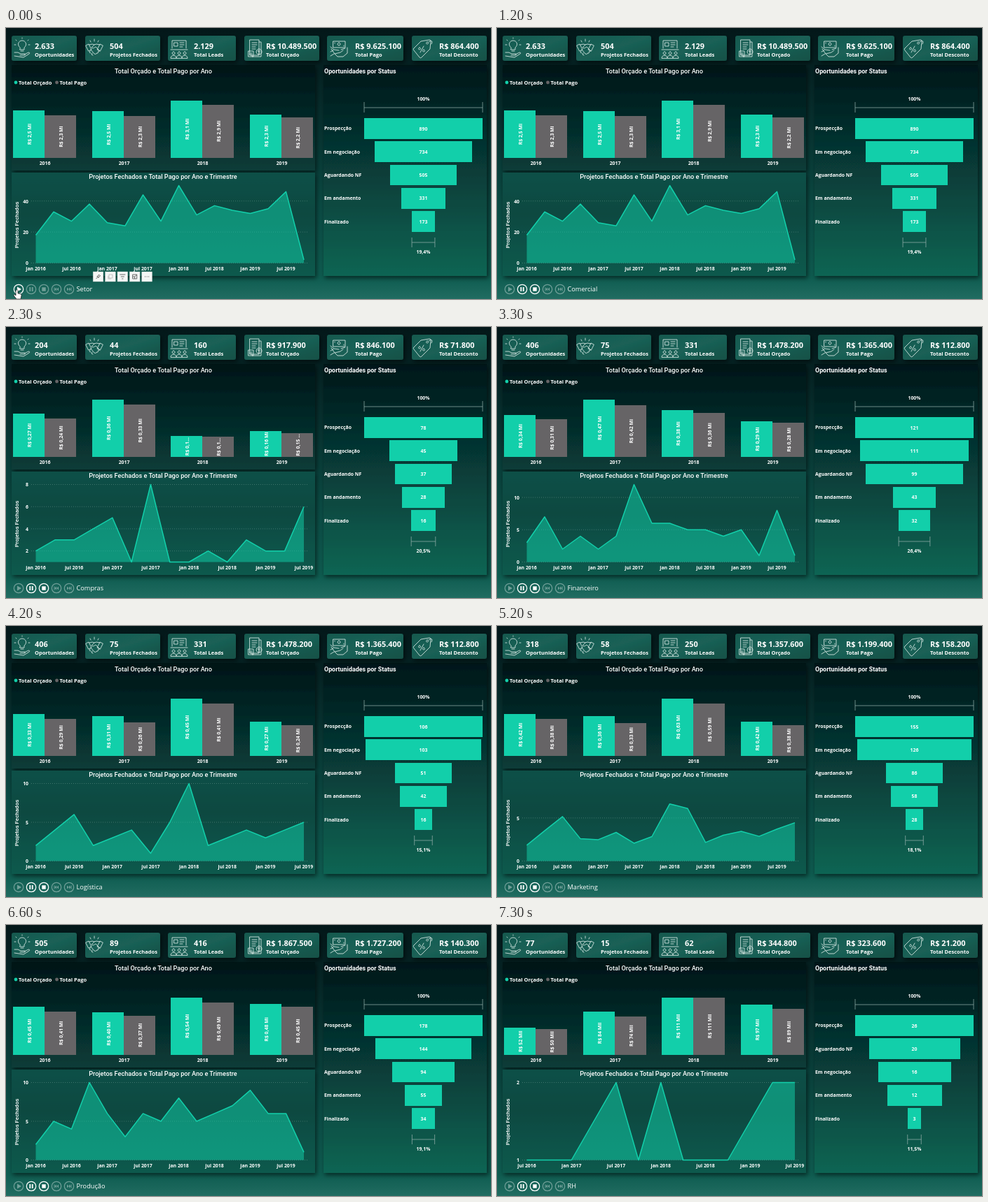
Recreate the animation shown at these times as an HTML page. Size 692 by 388 pixels, loop 8 s.

```html
<!DOCTYPE html>
<html lang="pt-BR">
<head>
<meta charset="utf-8">
<title>Painel de oportunidades</title>
<style>
html, body { margin: 0; width: 100%; height: 100%; overflow: hidden; background: #06292a; }
svg { display: block; width: 692px; height: 388px; }
text { font-family: "Open Sans", "Noto Sans", sans-serif; font-weight: 700; fill: #fff; }
.din { font-family: Roboto, "Liberation Sans", sans-serif; font-weight: 500; }
.kv { font-size: 10.9px; }
.kl { font-size: 7.5px; }
.s { font-size: 6.9px; }
.mid { text-anchor: middle; }
.end { text-anchor: end; }
.crisp { shape-rendering: crispEdges; }
.icon { fill: none; stroke: #e6f3ef; stroke-width: .8; stroke-linecap: round; stroke-linejoin: round; }
</style>
</head>
<body>
<svg id="stage" viewBox="0 0 692 388">
  <defs>
    <linearGradient id="bg" x2="0" y2="1">
      <stop offset="0" stop-color="#031719"/><stop offset=".3" stop-color="#062d2c"/>
      <stop offset=".65" stop-color="#0a4a43"/><stop offset=".92" stop-color="#0e5c50"/>
      <stop offset="1" stop-color="#216c61"/>
    </linearGradient>
    <linearGradient id="top" x2="0" y2="1">
      <stop offset="0" stop-color="#021517"/><stop offset="1" stop-color="#083c38"/>
    </linearGradient>
    <linearGradient id="low" x2="0" y2="1">
      <stop offset="0" stop-color="#0e5047"/><stop offset=".4" stop-color="#0a4941"/>
      <stop offset="1" stop-color="#0b5a4d"/>
    </linearGradient>
    <linearGradient id="side" x2="0" y2="1">
      <stop offset="0" stop-color="#021719"/><stop offset=".5" stop-color="#073c38"/>
      <stop offset="1" stop-color="#0b6553"/>
    </linearGradient>
    <linearGradient id="card" x2="1" y2="1">
      <stop offset="0" stop-color="#17594f"/><stop offset=".5" stop-color="#1a6156"/>
      <stop offset="1" stop-color="#135046"/>
    </linearGradient>
    <filter id="shade" x="-10%" y="-10%" width="125%" height="130%">
      <feDropShadow dx="2" dy="3" stdDeviation="3" flood-color="#000" flood-opacity=".55"/>
    </filter>
  </defs>
  <rect width="692" height="388" fill="url(#bg)"/>
  <g filter="url(#shade)">
    <rect x="8" y="53" width="433" height="151" fill="url(#top)"/>
    <rect x="8" y="207" width="433" height="148" fill="url(#low)"/>
    <rect x="453" y="53" width="233" height="302" fill="url(#side)"/>
  </g>
</svg>
<script>
const TEAL = "#12cfaa", GREY = "#666466";
const LEFT = 42.5, SPAN = 382.5, FLOOR = 336.5, RISE = 111;
const stage = document.getElementById("stage");

function add(tag, attrs = {}, parent = stage) {
  const el = document.createElementNS("http://www.w3.org/2000/svg", tag);
  set(el, attrs);
  parent.append(el);
  return el;
}
function set(el, attrs) {
  for (const k in attrs) el.setAttribute(k, attrs[k]);
}
function write(x, y, str, cls, attrs = {}, parent = stage) {
  const el = add("text", { x, y, class: cls, ...attrs }, parent);
  el.textContent = str;
  return el;
}
const clamp = v => Math.min(Math.max(v, 0), 1);

const STATUS = ["Prospecção", "Em negociação", "Aguardando NF", "Em andamento", "Finalizado"];

// label, charts and kpi are the times at which each part switches; fade is the chart transition
const states = [
  { name: "Setor", label: 0, charts: 0, fade: 0, kpi: 0,
    kpis: ["2.633", "504", "2.129", "10.489.500", "9.625.100", "864.400"],
    bars: [2.54, 2.28, 2.5, 2.26, 3.08, 2.86, 2.33, 2.16], digits: 1,
    funnel: [890, 734, 505, 331, 173], ticks: [0, 20, 40],
    line: [18, 33, 27, 38, 26, 24, 44, 27, 50, 31, 37, 34, 32, 35, 46, 2] },
  { name: "Comercial", label: 1100, charts: 1300, fade: 200, kpi: 1400,
    kpis: ["670", "134", "540", "2.698.300", "2.476.900", "221.400"],
    bars: [.64, .59, .57, .52, .9, .82, .59, .55],
    funnel: [226, 189, 118, 93, 44], ticks: [0, 5, 10],
    line: [5, 9, 8, 10, 6, 8, 11, 8, 14, 9, 10, 8, 7, 9, 11, 1] },
  { name: "Compras", label: 2000, charts: 2300, fade: 0, kpi: 2300,
    kpis: ["204", "44", "160", "917.900", "846.100", "71.800"],
    bars: [.27, .24, .36, .33, .13, .125, .16, .15],
    funnel: [78, 45, 37, 28, 16], ticks: [2, 4, 6, 8], base: 1,
    line: [2, 3, 3, 4, 5, 1, 8, 1, 1, 2, 1, 3, 2, 2, 6] },
  { name: "Financeiro", label: 3100, charts: 3200, fade: 90, kpi: 3200,
    kpis: ["406", "75", "331", "1.478.200", "1.365.400", "112.800"],
    bars: [.34, .31, .47, .42, .38, .36, .29, .28],
    funnel: [121, 111, 99, 43, 32], ticks: [0, 5, 10],
    line: [3, 7, 2, 4, 2, 4, 12, 6, 6, 5, 5, 4, 5, 1, 8, 1] },
  { name: "Logística", label: 4100, charts: 4100, fade: 90, kpi: 4300,
    kpis: ["318", "58", "250", "1.357.600", "1.199.400", "158.200"],
    bars: [.33, .29, .31, .26, .45, .41, .27, .24],
    funnel: [106, 103, 51, 42, 16], ticks: [0, 5, 10],
    line: [2, 4, 6, 2, 3, 4, 1, 5, 10, 2, 3, 4, 3, 4, 5] },
  { name: "Marketing", label: 5100, charts: 5200, fade: 200, kpi: 5300,
    kpis: ["453", "89", "370", "1.825.200", "1.686.500", "138.700"],
    bars: [.42, .38, .36, .33, .63, .59, .42, .38],
    funnel: [155, 126, 86, 58, 28], ticks: [0, 5],
    line: [4, 6, 5, 7, 4, 5, 8, 4, 9, 5, 6, 7, 5, 6, 7, 1] },
  { name: "Produção", label: 6000, charts: 6000, fade: 90, kpi: 6100,
    kpis: ["505", "89", "416", "1.867.500", "1.727.200", "140.300"],
    bars: [.45, .41, .4, .37, .54, .49, .48, .45],
    funnel: [178, 144, 94, 55, 34], ticks: [0, 5, 10],
    line: [2, 5, 4, 10, 6, 3, 6, 5, 8, 5, 6, 7, 9, 6, 6, 1] },
  { name: "RH", label: 7000, charts: 7100, fade: 190, kpi: 7200,
    kpis: ["77", "15", "62", "344.800", "323.600", "21.200"],
    bars: [52, 50, 84, 74, 111, 111, 97, 89], digits: 0, unit: "Mil",
    funnel: [26, 20, 16, 12, 3], order: [0, 2, 1, 3, 4], ticks: [1, 2], base: 1, start: 1,
    line: [1, 1, 1, 1.5, 2, 1, 2, 1, 1, 1, 1.5, 2, 2] }
];

// Scaled geometry of each state
for (const s of states) {
  const top = Math.max(...s.bars), base = s.base || 0, peak = Math.max(...s.line);
  const last = s.line.length - 1;
  s.heights = s.bars.map(v => v / top * 82.3);
  s.widths = s.funnel.map(v => v / s.funnel[0] * 169);
  s.yOf = v => FLOOR - (v - base) / (peak - base) * RISE;
  s.xOf = i => LEFT + i * SPAN / last;
  s.lineAt = x => {
    const p = (x - LEFT) / SPAN * last;
    const i = Math.min(Math.floor(p), last - 1);
    return s.yOf(s.line[i] + (s.line[i + 1] - s.line[i]) * (p - i));
  };
}

function barText(s, i) {
  const num = s.bars[i].toFixed(s.digits ?? 2).replace(".", ",");
  const h = s.heights[i];
  if (h < 32) return `R$ ${num.slice(0, 3)}...`;
  return h < 36 ? `R$ ${num} ...` : `R$ ${num} ${s.unit || "Mi"}`;
}

// KPI cards
const icons = [
  "M20 28c-5-4-2-10 3-10s8 6 3 10v3h-6zM21 33h4M23 15v-1M15 18l-1-1M31 18l1-1M14 24h-2M32 24h2M12 35h5l4 2h5c2 0 2 2 0 2h-6M26 38l6-3c2 0 2 1 1 2l-8 5-13-2",
  "M114 25l4-2 4 8-4 2zM138 25l-4-2-4 8 4 2zM119 24l4-1 3 1 3-1 5 1M126 24l-4 4c2 2 4 0 6-1l5 5M121 31l5 6c2 1 3 0 3-1 2 1 3-1 2-2 2 0 3-1 2-2M120 33l-1 2 2 1M123 36l-1 2 2 1M126 19v-3M121 20l-1-2M131 20l1-2",
  "M237 29v-11h20v11M240 21h5v5h-5zM248 21h6M248 24h6M248 27h4M235 31h24M239 34a2 2 0 1 0 .1 0M247 34a2 2 0 1 0 .1 0M255 34a2 2 0 1 0 .1 0M235 43c0-5 8-5 8 0 0-5 8-5 8 0 0-5 8-5 8 0z",
  "M348 17h13v22h-13zM351 21h7M351 24h7M351 27h5M351 30h5M361 20h3v21h-13v-2M346 33h7v8h-7zM348 36h3M348 38h3M361 30a4 4 0 1 0 .1 0M361 32v5M359 33h3",
  "M467 19h17v9h-17zM475 21a2 2 0 1 0 .1 0M469 21v1M482 25v1M463 27l5 4 7 1M463 34l4-2M487 28v8l-6 5h-8l-4-4 8-2 4-3M463 40l5-3M464 30l5 7M478 31l6-2",
  "M582 29l10-10 12-2c2 0 2 1 2 2l-1 11-12 12c-1 1-2 1-3 0l-8-10c-1-1-1-2 0-3zM601 20a1.5 1.5 0 1 0 .1 0M590 28a1.5 1.5 0 1 0 .1 0M596 31a1.5 1.5 0 1 0 .1 0M591 35l5-9M603 20c5-4 6 0 4 3"
];
const cards = [
  [8, 93, 41, "Oportunidades"], [113, 107, 148, "Projetos Fechados"], [231, 97, 268, "Total Leads"],
  [340, 107, 371, "Total Orçado"], [458, 109, 498, "Total Pago"], [579, 107, 618, "Total Desconto"]
];
const kpiEls = cards.map(([x, width, tx, name], i) => {
  add("rect", { x, y: 11, width, height: 36, rx: 3, fill: "url(#card)", filter: "url(#shade)" });
  add("path", { d: icons[i], class: "icon" });
  write(tx, 41, name, "kl");
  return write(tx, 30, "", "kv");
});

// Titles and legend
write(224.5, 65, "Total Orçado e Total Pago por Ano", "din mid", { "font-size": 9.15 });
write(224, 216, "Projetos Fechados e Total Pago por Ano e Trimestre", "din mid", { "font-size": 9.15 });
write(454, 65, "Oportunidades por Status", "din", { "font-size": 8.9, style: "font-weight:700" });
add("circle", { cx: 14, cy: 78, r: 2.4, fill: TEAL });
write(18, 80.7, "Total Orçado", "kl");
add("circle", { cx: 72.5, cy: 78, r: 2.4, fill: GREY });
write(76.5, 80.7, "Total Pago", "kl");

// Bars
const groupX = i => 10 + Math.round(i * 112.6);
const barEls = states[0].bars.map((_, i) => {
  const x = groupX(i >> 1) + (i % 2) * 45;
  const rect = add("rect", { x, width: 45, fill: i % 2 ? GREY : TEAL, class: "crisp" });
  return { x: x + 25.5, rect, text: write(0, 0, "", "s mid") };
});
for (let i = 0; i < 4; i++) write(groupX(i) + 45.5, 195.5, 2016 + i, "s mid");

// Area chart
const grid = add("g");
const area = add("path", { fill: TEAL, "fill-opacity": .52 });
const line = add("path", { fill: "none", stroke: TEAL, "stroke-width": 1.5, "stroke-linejoin": "round" });
const axis = add("g");
write(0, 0, "Projetos Fechados", "din mid", { "font-size": 8, transform: "translate(17.5 282) rotate(-90)" });

// Funnel
const bracket = add("path", { fill: "none", stroke: "#9db5b0", "stroke-width": .7 });
write(595.5, 104, "100%", "s mid");
const share = write(595.5, 323, "", "s mid");
const funnelEls = STATUS.map((_, i) => {
  const y = 129 + i * 33.3;
  return {
    rect: add("rect", { y, height: 29.8, fill: TEAL, class: "crisp" }),
    name: write(454, y + 17.3, "", "s"),
    value: write(595.5, y + 17.5, "", "s mid")
  };
});

// Player controls
const glyphs = ["M-2-3.5L4 0L-2 3.5z", "M-2.6-3h1.8v6h-1.8zM.8-3h1.8v6H.8z", "M-2.7-2.7h5.4v5.4h-5.4z",
  "M-3.5-2.5h1v5h-1zM0-2.5v5L-2.5 0zM3-2.5v5L.3 0z", "M3.5-2.5h-1v5h1zM0-2.5v5L2.5 0zM-3-2.5v5L-.3 0z"];
const buttons = glyphs.map((d, i) => {
  const g = add("g", { transform: `translate(${18 + i * 18} 374)` });
  add("circle", { r: 6.7, fill: "none", stroke: "#fff", "stroke-width": 1.2 }, g);
  add("path", { d, fill: "#fff" }, g);
  return g;
});
const sector = write(100.5, 377.3, "", "", { "font-size": 9.2, style: "font-weight:400" });

// Hover toolbar
const tools = add("g");
const toolArt = ["M-3 3L-.5.5M-2-1l3 3M-1 0l2-3 2 2-3 2", "M-2-3h5v5h-5zM-3-1v4h4", "M-4-3h8M-2.5 0h5M-1 3h2",
  "M-3-3h6v6h-6zM0 0l3-3M-3 0h3v3", "M-3 0h.6M-.3 0h.6M2.4 0h.6"];
toolArt.forEach((d, i) => {
  const g = add("g", { transform: `translate(${131.5 + i * 17.4} 356)` }, tools);
  add("rect", { x: -7.3, y: -7, width: 14.6, height: 14, fill: "#f4f6f5", stroke: "#c9d2cf", "stroke-width": .5 }, g);
  add("path", { d, fill: "none", stroke: i === 1 ? "#b5b5b5" : "#444", "stroke-width": i === 4 ? 1.3 : .8 }, g);
});
const hand = add("path", {
  d: "M0 0c1-1 2 0 2 1v4l4 1c1 0 1 1 1 2l-1 5H0l-4-5c0-1 1-2 2-1l1 1V1z",
  fill: "#fff", stroke: "#111", "stroke-width": .7
});

let shown = -1;
function drawLabels(k) {
  if (k === shown) return;
  shown = k;
  const s = states[k];
  grid.replaceChildren();
  axis.replaceChildren();
  for (const v of s.ticks) {
    const y = s.yOf(v);
    add("path", { d: `M36 ${y}H432`, stroke: "#8fb5ab", "stroke-opacity": .55, "stroke-width": .7, "stroke-dasharray": "1 2" }, grid);
    write(32, y + 2.8, v, "s end", {}, axis);
  }
  for (let i = 0; i < s.line.length; i += 2) {
    const half = i / 2 + (s.start || 0);
    write(s.xOf(i), 347, `${half % 2 ? "jul" : "jan"} ${2016 + (half >> 1)}`, "s mid", {}, axis);
  }
  barEls.forEach((b, i) => b.text.textContent = barText(s, i));
  funnelEls.forEach((f, i) => {
    f.name.textContent = STATUS[s.order ? s.order[i] : i];
    f.value.textContent = s.funnel[i];
  });
  share.textContent = (s.funnel[4] / s.funnel[0] * 100).toFixed(1).replace(".", ",") + "%";
}

function drawCharts(k, t) {
  const s = states[k], prev = states[Math.max(k - 1, 0)];
  const p = s.fade ? clamp((t - s.charts) / s.fade) : 1;
  const mix = (a, b) => a + (b - a) * (1 - (1 - p) ** 3);
  drawLabels(k);
  barEls.forEach((b, i) => {
    const h = mix(prev.heights[i], s.heights[i]);
    set(b.rect, { y: 186 - h, height: h });
    set(b.text, { transform: `translate(${b.x} ${186 - h / 2}) rotate(-90)` });
  });
  let w = 0;
  funnelEls.forEach((f, i) => {
    w = mix(prev.widths[i], s.widths[i]);
    set(f.rect, { x: 595.5 - w / 2, width: w });
  });
  const l = 595.5 - w / 2, r = l + w;
  set(bracket, { d: `M511 106v15M511 114H680M680 106v15M${l} 300v14M${l} 307H${r}M${r} 300v14` });
  const pts = s.line.map((v, i) => {
    const x = s.xOf(i);
    return `${x.toFixed(2)} ${mix(prev.lineAt(x), s.yOf(v)).toFixed(2)}`;
  }).join("L");
  set(line, { d: "M" + pts });
  set(area, { d: `M${LEFT} ${FLOOR}L${pts}V${FLOOR}z` });
}

function draw(t) {
  const at = key => states.findLastIndex(s => s[key] <= t);
  drawCharts(at("charts"), t);
  states[at("kpi")].kpis.forEach((v, i) => kpiEls[i].textContent = (i > 2 ? "R$ " : "") + v);
  sector.textContent = states[at("label")].name;
  const playing = t >= 200;
  buttons.forEach((b, i) => {
    const on = playing ? i === 1 || i === 2 : i === 0;
    set(b, { opacity: on ? 1 : .38 });
  });
  const away = clamp((t - 300) / 350);
  set(hand, {
    transform: `translate(${15 - away * 4} ${375 + away * away * 16})`,
    visibility: t < 700 ? "visible" : "hidden"
  });
  set(tools, { opacity: clamp((600 - t) / 150) });
}

const began = performance.now();
function tick() {
  draw((performance.now() - began) % 8000);
  requestAnimationFrame(tick);
}
tick();
</script>
</body>
</html>
```
